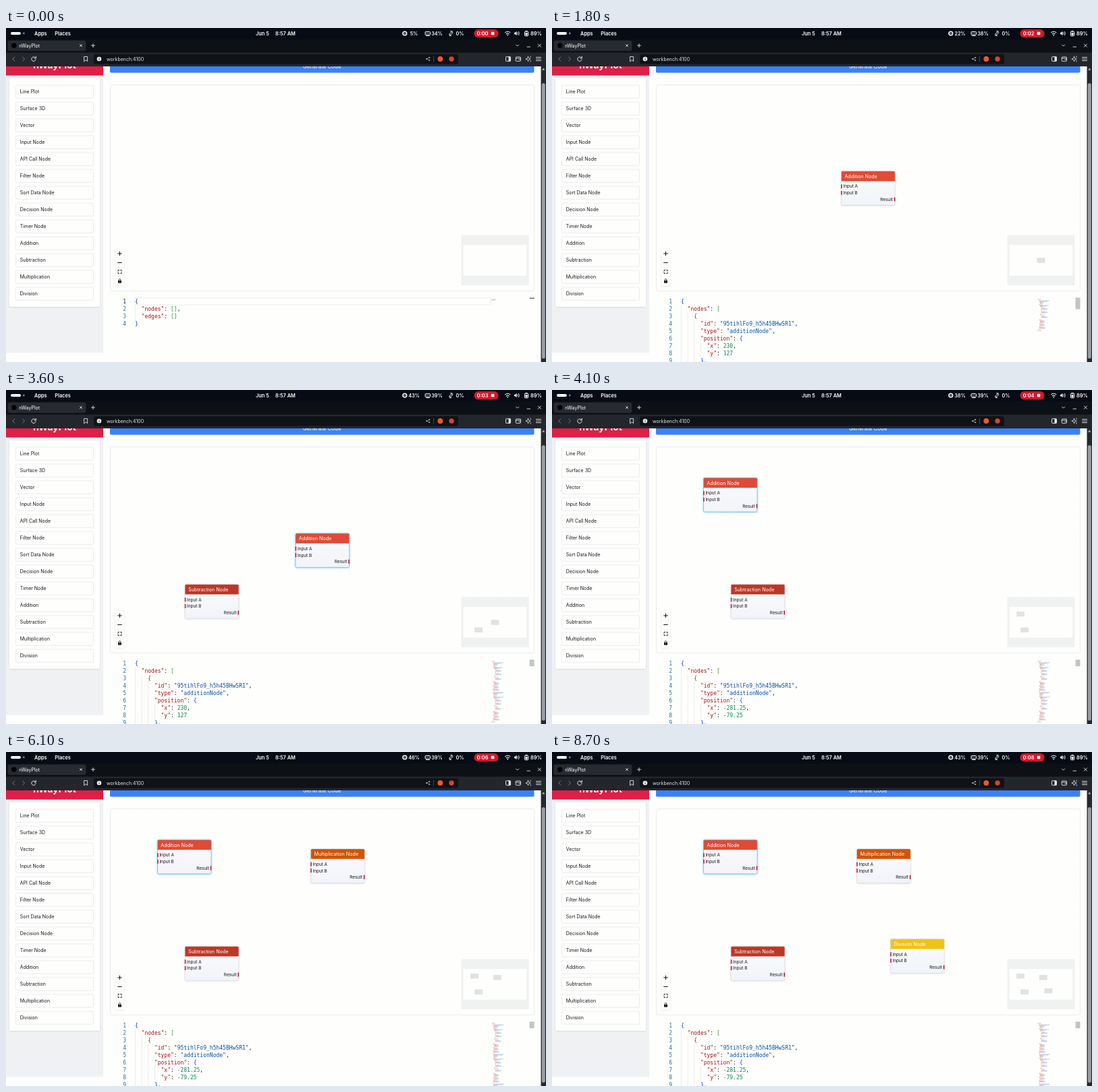
Recreate the animation shown at these times as an HTML page. Size 800 px wide and 496 px high, loop 8.8 s.

```html
<!DOCTYPE html>
<html lang="en">
<head>
<meta charset="utf-8">
<title>Node editor</title>
<style>
html, body { margin: 0; width: 100%; height: 100%; overflow: hidden; background: #fefefd; }
svg { display: block; width: 100%; height: 100%; }
text { font-family: Inter, Roboto, sans-serif; white-space: pre; }
.mono { font-family: "DejaVu Sans Mono", "Liberation Mono", monospace; }
</style>
</head>
<body>
<svg id="stage" viewBox="0 0 800 496"></svg>
<script>
const NS = 'http://www.w3.org/2000/svg';
const stage = document.getElementById('stage');
const LOOP = 8800, STEP = 100;

function el(parent, tag, attrs = {}, text) {
  const e = document.createElementNS(NS, tag);
  for (const k in attrs) e.setAttribute(k, attrs[k]);
  if (text !== undefined) e.textContent = text;
  parent.appendChild(e);
  return e;
}
const group = (p, a) => el(p, 'g', a);
const rect = (p, x, y, width, height, fill, more) => el(p, 'rect', { x, y, width, height, fill, ...more });
const disc = (p, cx, cy, r, fill) => el(p, 'circle', { cx, cy, r, fill });
const line = (p, d, stroke, w = 1, more) =>
  el(p, 'path', { d, stroke, 'stroke-width': w, fill: 'none', 'stroke-linecap': 'round', 'stroke-linejoin': 'round', ...more });
// y is the middle of the capitals
const label = (p, x, y, str, size, fill, more) =>
  el(p, 'text', { x, y: y + size * 0.36, 'font-size': size, fill, ...more }, str);

const defs = el(stage, 'defs');
function shadow(id, dy, blur, color, opacity) {
  const f = el(defs, 'filter', { id, x: '-20%', y: '-30%', width: '140%', height: '160%' });
  el(f, 'feDropShadow', { dx: 0, dy, stdDeviation: blur, 'flood-color': color, 'flood-opacity': opacity });
}
shadow('soft', 0.6, 0.9, '#000', 0.2);
shadow('glow', 0.3, 1.5, '#2aa5e8', 0.75);
shadow('card', 0.8, 1.3, '#000', 0.1);
const dots = el(defs, 'pattern', { id: 'dots', x: 154, y: 84, width: 8, height: 8, patternUnits: 'userSpaceOnUse' });
disc(dots, 4, 4, 0.3, '#d8d8d8');
const grad = el(defs, 'linearGradient', { id: 'nodeBody', x2: 0, y2: 1 });
el(grad, 'stop', { offset: 0, 'stop-color': '#fafbfc' });
el(grad, 'stop', { offset: 1, 'stop-color': '#f1f4f9' });

const WHITE = '#fefefd', BRAND = 'nWayPlot';
const ITEMS = ['Line Plot', 'Surface 3D', 'Vector', 'Input Node', 'API Call Node', 'Filter Node', 'Sort Data Node',
  'Decision Node', 'Timer Node', 'Addition', 'Subtraction', 'Multiplication', 'Division'];
const itemY = i => 85 + 25 * i;

function drawItem(p, name, x, y) {
  rect(p, x, y, 115, 19.3, WHITE, { rx: 2, stroke: '#e1e4e8', 'stroke-width': 0.7 });
  label(p, x + 6.3, y + 9.8, name, 7, '#16181d');
}

function drawSidebar() {
  rect(stage, 0, 57, 144, 425.5, '#eff1f2');
  rect(stage, 0, 50, 144, 20.5, '#e11d48');
  label(stage, 72, 55.5, BRAND, 13.8, '#fff', { 'font-weight': 700, 'text-anchor': 'middle' });
  rect(stage, 5, 75, 134, 339, WHITE, { rx: 2, filter: 'url(#card)' });
  ITEMS.forEach((n, i) => drawItem(stage, n, 14.5, itemY(i)));
}

function drawCanvas() {
  rect(stage, 154, 48, 628.5, 18.5, '#3b82f6', { rx: 2 });
  label(stage, 468.3, 56.8, 'Generate Code', 7.9, '#fff', { 'text-anchor': 'middle' });
  rect(stage, 154.5, 84.5, 628, 306, WHITE, { rx: 2, stroke: '#e4e6e8', 'stroke-width': 0.7 });
  rect(stage, 155, 85, 627, 305, 'url(#dots)');
}

function drawControls() {
  rect(stage, 162, 328, 13, 54.5, WHITE, { filter: 'url(#card)' });
  for (const y of [341.7, 355.3, 369]) line(stage, `M162 ${y}h13`, '#eee', 0.5);
  line(stage, 'M165.7 335h5.6M168.5 332.2v5.6M165.7 348.5h5.6', '#111', 1);
  line(stage, 'M166 361v-1.4h1.6M169.6 359.6h1.6v1.4M171.2 363v1.4h-1.6M167.6 364.4h-1.6v-1.4', '#111', 0.9);
  rect(stage, 166, 375, 5, 3.8, '#111', { rx: 0.7 });
  line(stage, 'M167.1 375v-1a1.4 1.4 0 0 1 2.8 0v1', '#111', 0.8);
  disc(stage, 168.5, 376.8, 0.5, '#fff');
}

function drawBrowser() {
  const ink = '#e4e6e9';
  rect(stage, 0, 0, 800, 57, '#23262b');
  rect(stage, 0, 0, 800, 36.5, '#0d1015');
  rect(stage, 0, 0, 800, 16.5, '#060b15');

  rect(stage, 7, 6, 15, 4, '#fff', { rx: 2 });
  disc(stage, 26.3, 8, 1.4, '#7d828b');
  const bold = { 'font-weight': 600 }, mid = { ...bold, 'text-anchor': 'middle' };
  label(stage, 42, 8, 'Apps', 7.4, '#fff', bold);
  label(stage, 72.2, 8, 'Places', 7.4, '#fff', bold);
  label(stage, 370, 8, 'Jun 5', 7.4, '#fff', bold);
  label(stage, 399, 8, '8:57 AM', 7.4, '#fff', bold);
  label(stage, 672.5, 8, '0%', 7.2, '#fff', mid);
  label(stage, 785.5, 8, '89%', 7.4, '#fff', mid);
  disc(stage, 590.8, 8, 3.6, '#fff');
  rect(stage, 589, 6.2, 3.6, 3.6, '#060b15', { rx: 0.6 });
  disc(stage, 590.8, 8, 0.8, '#fff');
  rect(stage, 621, 5.5, 7.5, 4.6, 'none', { rx: 1, stroke: '#fff' });
  line(stage, 'M622.8 7.6h.1M624.8 7.6h.1M626.8 7.6h.1M622.5 11.5h4.8', '#fff', 0.9);
  line(stage, 'M656.5 9.3l4.2-4.2M658.6 4.8h2.4v2.2M661.8 7l-4.2 4.2M659.6 11.4h-2.4v-2.2', '#fff', 0.9);
  rect(stage, 693.5, 2, 36, 12.3, '#d0192d', { rx: 6.1 });
  rect(stage, 718.7, 5.7, 4.6, 4.6, '#fff', { rx: 0.8 });
  line(stage, 'M739.6 6.7q3.6-3 7.2 0M741.3 8.7q1.9-1.5 3.8 0', '#fff', 1.1);
  disc(stage, 743.2, 10.6, 0.9, '#fff');
  el(stage, 'path', { d: 'M753 6.8h1.5l2-2v6.4l-2-2h-1.5z', fill: '#fff' });
  line(stage, 'M758 6.5q1 1.5 0 3M759.6 5.3q1.8 2.7 0 5.4', '#fff', 0.8);
  rect(stage, 768.4, 5.2, 5.2, 6.6, 'none', { rx: 1, stroke: '#fff' });
  rect(stage, 769.6, 4, 2.8, 1.2, '#fff');
  rect(stage, 769.6, 7, 2.8, 3.8, '#fff');

  rect(stage, 2.5, 18.5, 116, 15.5, '#272b31', { rx: 3 });
  disc(stage, 11.8, 26, 3.8, '#000');
  label(stage, 19.3, 26, BRAND, 7, '#fff');
  line(stage, 'M109.5 24.5l3 3M112.5 24.5l-3 3M126.5 26h5M129 23.5v5', ink, 0.9);
  line(stage, 'M755.6 25l2 2 2-2M772 28h4.5M788.2 23.8l4.4 4.4M792.6 23.8l-4.4 4.4', ink, 0.9);

  line(stage, 'M12.8 43l-3 3 3 3M24.6 43l3 3-3 3', '#777c84', 1);
  line(stage, 'M43.6 44.2a3.2 3.2 0 1 0 .6 2.4M44.4 42.4v2.4h-2.4', ink, 1);
  line(stage, 'M116 42.5h4.6v7l-2.3-1.9-2.3 1.9z', ink, 0.9);
  rect(stage, 130, 39, 540, 14.5, '#0f1217', { rx: 3 });
  disc(stage, 138, 46, 3.3, '#f0f1f2');
  line(stage, 'M138 46v1.5M138 44.3v.1', '#0f1217', 0.9);
  label(stage, 149, 46, 'workbench:4100', 7, '#e8e9eb');
  line(stage, 'M627.2 44l-4 2 4 2', '#a9adb3', 0.7);
  for (const [x, y] of [[627.2, 44], [623, 46], [627.2, 48]]) disc(stage, x, y, 1.1, '#a9adb3');
  line(stage, 'M633.5 42v8', '#5b6068', 0.7);
  disc(stage, 643.3, 46, 3.9, '#f4562a');
  disc(stage, 660, 46, 3.7, '#d8432f');
  rect(stage, 740.5, 42.7, 7, 6.6, 'none', { rx: 0.8, stroke: ink });
  rect(stage, 744.5, 42.7, 3, 6.6, ink);
  rect(stage, 755.2, 43, 7.3, 6.3, 'none', { rx: 1, stroke: ink, 'stroke-width': 0.9 });
  line(stage, 'M755.4 45h7M760 47h2', ink, 0.9);
  line(stage, 'M773.5 42.3l1 2.7 2.7 1-2.7 1-1 2.7-1-2.7-2.7-1 2.7-1zM777 42v1.6M777 48.4v1.6', ink, 0.8);
  line(stage, 'M785.5 43.5h7M785.5 46h7M785.5 48.5h7', ink, 0.9);
}

function drawPageScroll() {
  rect(stage, 792.5, 57, 7.5, 439, '#25282c');
  el(stage, 'path', { d: 'M794 62.5l2.2-3 2.2 3z', fill: '#b5b8bc' });
  rect(stage, 793.8, 82, 5, 409, '#9b9ea2', { rx: 2.5 });
}

// lift / drop are times; from is where the dragged copy is first seen
const NODES = [
  { name: 'Addition', item: 9, x: 428.6, y: 212.6, color: '#e14a34', lift: 800, drop: 1300, from: 53, id: '95tihlFo9_h5h45BHwSR1' },
  { name: 'Subtraction', item: 10, x: 265.2, y: 288.8, color: '#be3726', lift: 2700, drop: 3000, from: 45, id: 'k27QvuXe4_m8d31TLnZC6' },
  { name: 'Multiplication', item: 11, x: 451.6, y: 144, color: '#d05404', lift: 5000, drop: 5400, from: 107, id: 'p63WsaRy7_c2b90KUfGJ5' },
  { name: 'Division', item: 12, x: 501.6, y: 277.8, color: '#f0c314', lift: 6900, drop: 7300, from: 202, id: 'x18DzoMi3_t6g57PNeHV2' },
];
const PICK = 3400, DRAG = [3600, 3900], MOVE = [-511.25, -206.25], ZOOM = 0.4;
const CPU = [[0, '5%', '34%'], [100, '22%', '38%'], [2100, '43%', '39%'], [4100, '38%', '39%'], [6100, '46%', '39%'], [8100, '43%', '39%']];

const clamp = v => Math.max(0, Math.min(1, v));
const smooth = v => v * v * (3 - 2 * v);
const dragged = t => smooth(clamp((t - DRAG[0]) / (DRAG[1] - DRAG[0])));

function place(n, t) {
  if (n.item !== 9) return [n.x, n.y];
  const k = dragged(t) * ZOOM, nudge = t >= PICK ? 0.4 : 0;
  return [n.x + MOVE[0] * k + nudge, n.y + MOVE[1] * k + nudge];
}

function drawNode(p, n, x, y, picked) {
  const g = group(p, { transform: `translate(${x} ${y})` });
  rect(g, 0, 0, 79.6, 50.4, 'url(#nodeBody)', { rx: 1.8, filter: `url(#${picked ? 'glow' : 'soft'})` });
  el(g, 'path', { d: 'M0 14.8V1.8Q0 0 1.8 0H77.8Q79.6 0 79.6 1.8V14.8Z', fill: n.color });
  rect(g, 0, 0, 79.6, 50.4, 'none', { rx: 1.8, stroke: picked ? '#5bbbe8' : '#c9ccd0', 'stroke-width': picked ? 0.7 : 0.4 });
  label(g, 4.8, 7.5, n.name + ' Node', 7.2, '#fff');
  label(g, 2.9, 22.6, 'Input A', 6.4, '#15171b');
  label(g, 2.9, 32.2, 'Input B', 6.4, '#15171b');
  label(g, 76.3, 41.8, 'Result', 6.4, '#15171b', { 'text-anchor': 'end' });
  for (const [hx, hy] of [[-0.4, 19.6], [-0.4, 29.2], [78.2, 38.8]]) rect(g, hx, hy, 1.6, 6, '#c5163c');
}

function drawGhost(p, n, t) {
  const k = (t - n.lift) / (n.drop - n.lift);
  const endX = n.x - 56, top = itemY(n.item);
  const first = (n.from - 14.5) / (endX - 14.5);
  const f = first + (1 - first) * Math.sin(k * Math.PI / 2);
  drawItem(group(p, { opacity: 0.75 }), n.name, 14.5 + (endX - 14.5) * f, top + (n.y - 10 - top) * f);
}

function drawMap(p, nodes, t) {
  const sc = 0.149, mx = x => 688 + (x - 224.2) * sc, my = y => 329 + (y - 130.2) * sc;
  rect(p, 674.5, 307.5, 100, 74.5, '#f0f1f1');
  rect(p, mx(154), my(84.5), 629 * sc, 306 * sc, WHITE);
  for (const n of nodes) {
    const [x, y] = place(n, t);
    rect(p, mx(x), my(y), 80 * sc, 50 * sc, '#e1e2e2');
  }
}

function makeJson(nodes, t) {
  const port = (id, name) => ({ id, name, type: 'number' });
  const list = nodes.map(n => {
    const k = n.item === 9 ? dragged(t) : 0;
    const start = n.item === 9 ? [230, 127] : [n.x - 337, n.y - 162].map(v => Math.round(v / ZOOM));
    return {
      id: n.id, type: n.name.toLowerCase() + 'Node',
      position: { x: +(start[0] + MOVE[0] * k).toFixed(2), y: +(start[1] + MOVE[1] * k).toFixed(2) },
      data: {
        label: n.name + ' Node', color: n.color,
        inputs: [port('a', 'Input A'), port('b', 'Input B')],
        outputs: [port('r', 'Result')],
      },
      style: { width: 199, height: 126, radius: 4, border: 1 },
      measured: { width: 199, height: 126 },
      zIndex: 0, selected: n.item === 9 && t >= PICK, dragging: false,
    };
  });
  return JSON.stringify({ nodes: list, edges: [] }, null, 2).split('\n');
}

const BRACKETS = ['#0431fa', '#319331', '#7b3814'];
function tokens(lines) {
  let depth = 0;
  return lines.map(s => s.match(/\s+|"[^"]*"(?=:)|"[^"]*"|[\[\]{}]|[:,]|[^\s,:\[\]{}]+/g).map((w, i, all) => {
    if (/[\[{]/.test(w)) return [w, BRACKETS[depth++ % 3]];
    if (/^[\]}]/.test(w)) return [w, BRACKETS[--depth % 3]];
    if (w[0] === '"') return [w, all[i + 1] === ':' ? '#a31515' : '#0451a5'];
    if (/^-?\d/.test(w)) return [w, '#098658'];
    return [w, /^\w/.test(w) ? '#0451a5' : '#222'];
  }));
}

function drawEditor(p, nodes, t) {
  const lines = makeJson(nodes, t), rows = tokens(lines), empty = !nodes.length;
  const lastEdit = Math.max(...nodes.map(n => n.drop), t > DRAG[0] ? Math.min(t, DRAG[1]) : 0);
  const plain = !empty && t - lastEdit < STEP;
  if (empty) {
    rect(p, 191, 401, 527, 10, 'none', { stroke: '#e8e9e9', 'stroke-width': 0.8 });
    rect(p, 775.8, 400.7, 7, 1.2, '#444');
  } else {
    rect(p, 775.5, 400.5, 7, nodes.length > 1 ? 9.8 : 17, '#c3c4c4');
  }
  rows.slice(0, 9).forEach((row, i) => {
    const y = 406 + 11 * i, indent = lines[i].search(/\S/);
    for (let c = 0; c < indent; c += 2) line(p, `M${191.5 + c * 4.816} ${y - 5.5}v11`, '#d9dbdb', 0.5, { 'stroke-linecap': 'butt' });
    label(p, 178, y, i + 1, 8, empty && !i ? '#0b216f' : '#237893', { class: 'mono', 'text-anchor': 'end' });
    const text = label(p, 191, y, '', 8, '#222', { class: 'mono' });
    for (const [w, fill] of row) el(text, 'tspan', { fill }, w);
  });
  const paths = {};
  rows.slice(0, 95).forEach((row, i) => {
    let x = 719;
    for (const [w, fill] of row) {
      const ink = plain ? '#333' : fill;
      if (w.trim()) paths[ink] = (paths[ink] || '') + `M${x} ${402 + i}h${w.length * 0.5}`;
      x += w.length * 0.5;
    }
  });
  for (const c in paths) line(p, paths[c], c, 0.65, { opacity: 0.5, 'stroke-linecap': 'butt', 'stroke-dasharray': '1.6 .4' });
}

drawSidebar();
drawCanvas();
const layer = group(stage);
drawControls();
const over = group(stage);
drawBrowser();
drawPageScroll();
const top7 = { 'font-weight': 600, 'text-anchor': 'middle' };
const cpu = label(stage, 604.5, 8, '', 7.2, '#fff', top7);
const mem = label(stage, 638.5, 8, '', 7.2, '#fff', top7);
const clock = label(stage, 706, 8, '', 7.4, '#fff', top7);

function render(t) {
  const nodes = NODES.filter(n => t >= n.drop);
  layer.replaceChildren();
  over.replaceChildren();
  for (const n of nodes) drawNode(layer, n, ...place(n, t), n.item === 9 && t >= PICK);
  drawMap(over, nodes, t);
  drawEditor(over, nodes, t);
  for (const n of NODES) if (t >= n.lift && t < n.drop) drawGhost(over, n, t);
  const use = CPU.filter(c => t >= c[0]).pop();
  cpu.textContent = use[1];
  mem.textContent = use[2];
  clock.textContent = '0:0' + Math.floor((t + 200) / 1000);
}

const t0 = performance.now();
let last = -1;
function tick() {
  const t = Math.floor(((performance.now() - t0) % LOOP) / STEP) * STEP;
  if (t !== last) render(last = t);
  requestAnimationFrame(tick);
}
tick();
</script>
</body>
</html>
```
